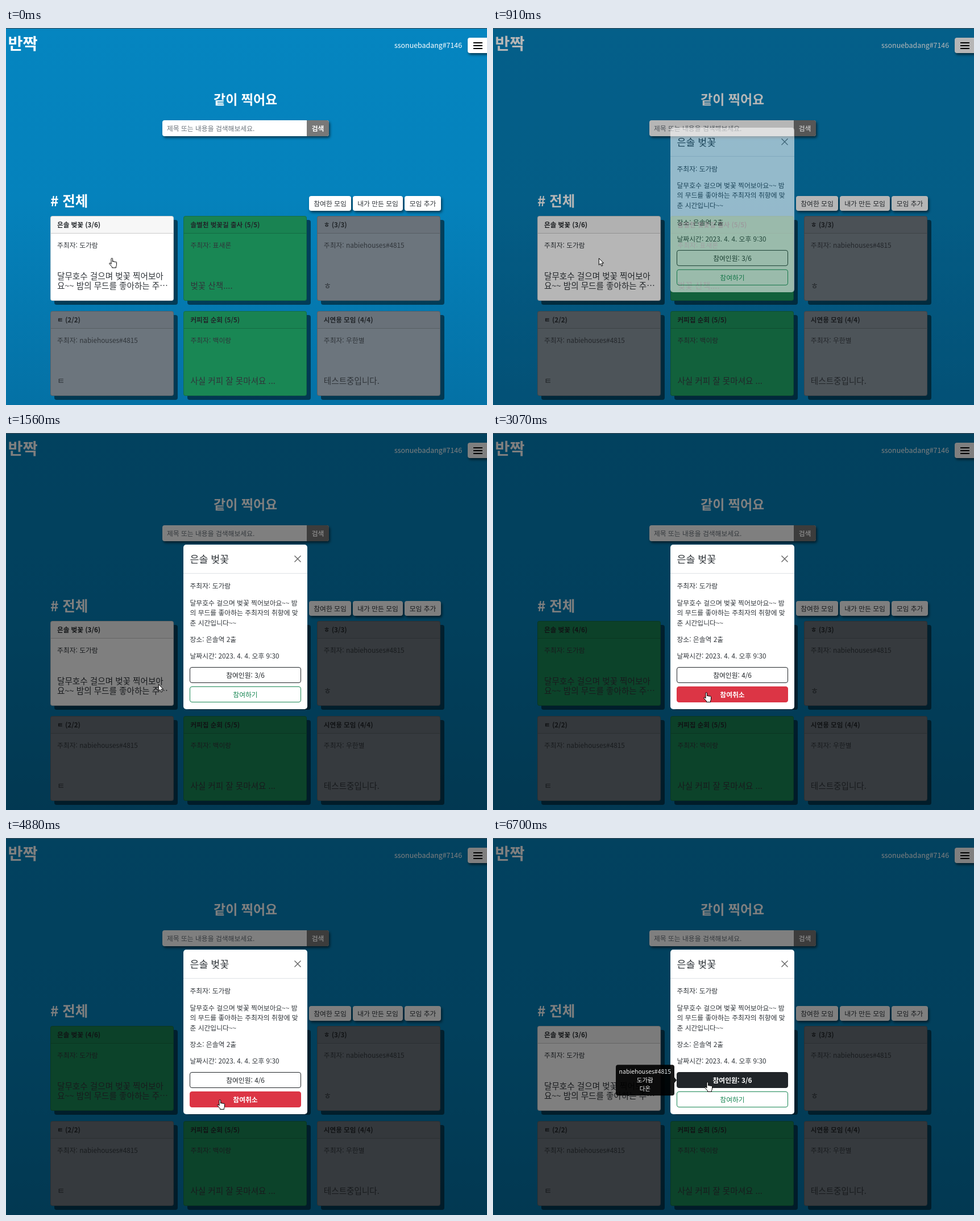
These frames come from a looping animation (846 px wide and 662 px high, 8380 ms). An HTML page:

```html
<!DOCTYPE html>
<html lang="ko">
<head>
<meta charset="utf-8">
<title>모임</title>
<style>
  html, body { margin: 0; width: 100%; height: 100%; overflow: hidden; }
  body {
    position: relative;
    font: 300 11.8px/18px "Noto Sans CJK KR", "Noto Sans CJK", "Noto Sans", sans-serif;
    color: #30353a;
    background: linear-gradient(#0585c0, #0582bc 45%, #0471a5);
  }
  body * { box-sizing: border-box; }
  .t, .box, .card, #shade, #modal, #tip, #cursor { position: absolute; }
  /* text placed by its left edge and vertical centre */
  .t {
    left: calc(var(--x) * 1px); top: calc(var(--y) * 1px);
    transform: translateY(-50%); white-space: nowrap;
  }
  .big { font-weight: 700; color: #fff; line-height: 1.4; }
  .box {
    left: calc(var(--x) * 1px); top: calc(var(--y) * 1px);
    width: calc(var(--w) * 1px); height: calc(var(--h) * 1px);
    display: flex; align-items: center; justify-content: center;
    background: #fff; border-radius: 4px; white-space: nowrap;
  }
  .raised { box-shadow: 2px 3px 4px rgba(0, 0, 0, .55); }
  #edge { position: absolute; inset: 0 0 auto; height: 1px; background: #3c4a55; }

  .card {
    width: 217px; height: 149px; border-radius: 4px; background: #fff;
    border: 1px solid rgba(0, 0, 0, .176);
    box-shadow: 7px 7px 0 rgba(0, 0, 0, .5);
  }
  .card.green { background: #198754; }
  .card.gray { background: #6c757d; }
  .card h3 {
    margin: 0; height: 30px; padding-left: 11px; font-size: 11.6px; line-height: 29px; font-weight: 700;
    color: #212529; background: rgba(33, 37, 41, .035);
    border-bottom: 1px solid rgba(0, 0, 0, .176); border-radius: 3px 3px 0 0;
  }
  .card p { position: absolute; margin: 0; left: 11px; white-space: nowrap; }
  .card .host { top: 41px; }
  .card .note { bottom: 17px; font-size: 14.6px; line-height: 17.6px; }

  #shade { inset: 1px 0 0; background: #000; }
  #modal {
    left: 312px; top: 196px; width: 218px; height: 289px;
    background: #fff; border-radius: 5px;
  }
  #modal hr { position: absolute; left: 0; right: 0; top: 50px; margin: 0; border: 0; border-top: 1px solid #dee2e6; }
  #modal svg { position: absolute; left: 195px; top: 19px; }
  .btn { border: 1px solid; }

  #tip {
    right: 527px; top: 425px; padding: 4px 6px; transform: translateY(-50%);
    text-align: center; white-space: pre-line;
    font-size: 10.5px; line-height: 15.2px; font-weight: 400;
    color: #fff; background: #000; border-radius: 4px;
  }
  #tip::after {
    content: ""; position: absolute; left: 100%; top: 50%; margin-top: -5px;
    border: 5px solid transparent; border-left: 4px solid #000; border-right: 0;
  }
  #cursor { left: 0; top: 0; overflow: visible; }
  #cursor path { fill: #fff; stroke: #000; stroke-width: 1; stroke-linejoin: round; }
</style>
</head>
<body>
  <div id="edge"></div>
  <span class="t big" style="--x:3.5;--y:26;font-size:28.4px">반짝</span>
  <span class="t" style="--x:683;--y:30;font-size:12.4px;color:#fff">ssonuebadang#7146</span>
  <div class="box raised" style="--x:812;--y:17;--w:40;--h:27">
    <svg width="16" height="12" style="margin-right:5px"><path d="M0 1h16M0 6h16M0 11h16" stroke="#000" stroke-width="2"/></svg>
  </div>
  <span class="t big" style="--x:365;--y:124;font-size:23px">같이 찍어요</span>
  <div class="box raised" style="--x:275;--y:162;--w:293;--h:28"></div>
  <span class="t" style="--x:283;--y:175.5;color:#6c757d">제목 또는 내용을 검색해보세요.</span>
  <div class="box" style="--x:529;--y:162;--w:39;--h:28;background:#787878;color:#fff;font-weight:700;border-radius:0 4px 4px 0">검색</div>
  <span class="t big" style="--x:78;--y:303;font-size:24.5px"># 전체</span>
  <div class="box raised" style="--x:533;--y:295;--w:74;--h:26">참여한 모임</div>
  <div class="box raised" style="--x:610;--y:295;--w:88;--h:26">내가 만든 모임</div>
  <div class="box raised" style="--x:701;--y:295;--w:64;--h:26">모임 추가</div>
  <div id="cards"></div>

  <div id="shade"></div>
  <div id="modal">
    <span class="t" style="--x:11.5;--y:24.5;font-size:17.4px;line-height:26px">은솔 벚꽃</span>
    <svg width="12" height="12"><path d="M.5 .5l11 11m0-11l-11 11" stroke="#666" stroke-width="1.4"/></svg>
    <hr>
    <span class="t" style="--x:11.5;--y:71.5">주최자: 도가람</span>
    <span class="t" style="--x:11.5;--y:118.5;line-height:17.6px">달무호수 걸으며 벚꽃 찍어보아요~~ 밤<br>의 무드를 좋아하는 주최자의 취향에 맞<br>춘 시간입니다~~</span>
    <span class="t" style="--x:11.5;--y:165.5">장소: 은솔역 2출</span>
    <span class="t" style="--x:11.5;--y:194.5">날짜시간: 2023. 4. 4. 오후 9:30</span>
    <div class="box btn" id="count" style="--x:11;--y:215;--w:196;--h:28"></div>
    <div class="box btn" id="join" style="--x:11;--y:249;--w:196;--h:28"></div>
  </div>
  <div id="tip"></div>
  <svg id="cursor" width="16" height="20">
    <path id="hand" d="M4 11V2a1.3 1.3 0 0 1 2.6 0V7a1.2 1.2 0 0 1 2.4.4 1.2 1.2 0 0 1 2.3.5 1.1 1.1 0 0 1 2.2.7V12q0 2-1 3.3V17.5H5.5V16L1 10.8Q.3 9.3 1.8 9.2 3 9.3 4 11Z" transform="translate(-5 -.5)"/>
    <path id="arrow" d="M.3 .3V12.2L3 9.7 4.9 14 6.9 13.1 5 8.9H8.7Z"/>
  </svg>

<script>
  const LOOP = 8380, STEP = 70, FADE = 140;
  const OPEN = 770, JOIN = 2480, LEAVE = 5700;
  const HOME = { x: 186, y: 404 };
  const MOVES = [
    { start: 910, time: 630, x: 268, y: 441 },
    { start: 1630, time: 280, x: 375, y: 455.5 },
    { start: 3070, time: 350, x: 374, y: 422 },
    { start: 4320, time: 560, x: 376, y: 459.5 },
    { start: 6280, time: 420, x: 377, y: 428.5 }
  ];
  const STARTS = [0, OPEN, JOIN, LEAVE, ...MOVES.map(m => m.start)];
  // the pointer enters a button halfway through each move
  const [, toJoin, toCount, backToJoin, backToCount] = MOVES.map(m => m.start + m.time / 2);

  const CARDS = [
    ['', '은솔 벚꽃 (3/6)', '도가람', '달무호수 걸으며 벚꽃 찍어보아<br>요~~ 밤의 무드를 좋아하는 주⋯'],
    ['green', '솔별천 벚꽃길 출사 (5/5)', '표새론', '벚꽃 산책....'],
    ['gray', 'ㅎ (3/3)', 'nabiehouses#4815', 'ㅎ'],
    ['gray', 'ㅌ (2/2)', 'nabiehouses#4815', 'ㅌ'],
    ['green', '커피집 순회 (5/5)', '백이랑', '사실 커피 잘 못마셔요 ...'],
    ['gray', '시연용 모임 (4/4)', '우한별', '테스트중입니다.']
  ];
  const $ = id => document.getElementById(id);
  $('cards').innerHTML = CARDS.map(([tone, title, host, note], i) =>
    `<div class="card ${tone}" style="left:${78 + i % 3 * 234.4}px;top:${330 + (i > 2) * 167}px">
      <h3>${title}</h3><p class="host">주최자: ${host}</p><p class="note">${note}</p></div>`).join('');
  const firstCard = $('cards').firstChild, firstTitle = firstCard.querySelector('h3');

  const WHITE = [255, 255, 255], DARK = [33, 37, 41], GREEN = [25, 135, 84], RED = [220, 53, 69];
  const ramp = (t, start, time = FADE) => Math.min(1, Math.max(0, (t - start) / time));
  const smooth = p => p * p * (3 - 2 * p);
  const easeOut = p => 1 - (1 - p) ** 2;
  const lerp = (a, b, p) => a + (b - a) * p;
  const mix = (a, b, p) => a.map((v, i) => lerp(v, b[i], p));
  const rgb = c => `rgb(${c.map(Math.round)})`;

  function pointerAt(t) {
    return MOVES.reduce((from, to) => {
      const p = smooth(ramp(t, to.start, to.time));
      return { x: lerp(from.x, to.x, p), y: lerp(from.y, to.y, p) };
    }, HOME);
  }

  function paint(el, hue, fill, label) {
    el.textContent = label;
    el.style.borderColor = rgb(hue);
    el.style.background = rgb(mix(WHITE, hue, fill));
    el.style.color = rgb(mix(hue, WHITE, fill));
    el.style.fontWeight = fill > .5 ? 700 : 300;
  }

  function render(time) {
    // each burst of motion advances in even steps
    const start = Math.max(...STARTS.filter(s => s <= time));
    const t = start + Math.floor((time - start) / STEP) * STEP;
    const joined = t >= JOIN && t < LEAVE;
    const people = joined ? '4/6' : '3/6';

    firstCard.classList.toggle('green', joined);
    firstTitle.textContent = `은솔 벚꽃 (${people})`;

    const shown = ramp(t, OPEN + 60);
    $('shade').style.opacity = shown / 2;
    $('modal').style.opacity = shown;
    $('modal').style.transform = `translateY(${-50 * (1 - easeOut(ramp(t, OPEN, 400)))}px)`;

    const onCount = ramp(t, toCount) - ramp(t, backToJoin) + ramp(t, backToCount);
    const onJoin = ramp(t, toJoin) - onCount;
    const red = ramp(t, JOIN) - ramp(t, LEAVE);
    paint($('count'), DARK, onCount, `참여인원: ${people}`);
    paint($('join'), mix(GREEN, RED, red), onJoin, joined ? '참여취소' : '참여하기');

    $('tip').style.opacity = onCount * .9;
    $('tip').textContent = (joined ? 'ssonuebadang#7146\n' : '') + 'nabiehouses#4815\n도가람\n다온';

    const pointing = t < OPEN + STEP || t >= toJoin;
    const { x, y } = pointerAt(t);
    $('hand').style.display = pointing ? '' : 'none';
    $('arrow').style.display = pointing ? 'none' : '';
    $('cursor').style.transform = `translate(${x}px, ${y}px)`;
  }

  const begin = performance.now();
  function tick() {
    render((performance.now() - begin) % LOOP);
    requestAnimationFrame(tick);
  }
  tick();
</script>
</body>
</html>
```
